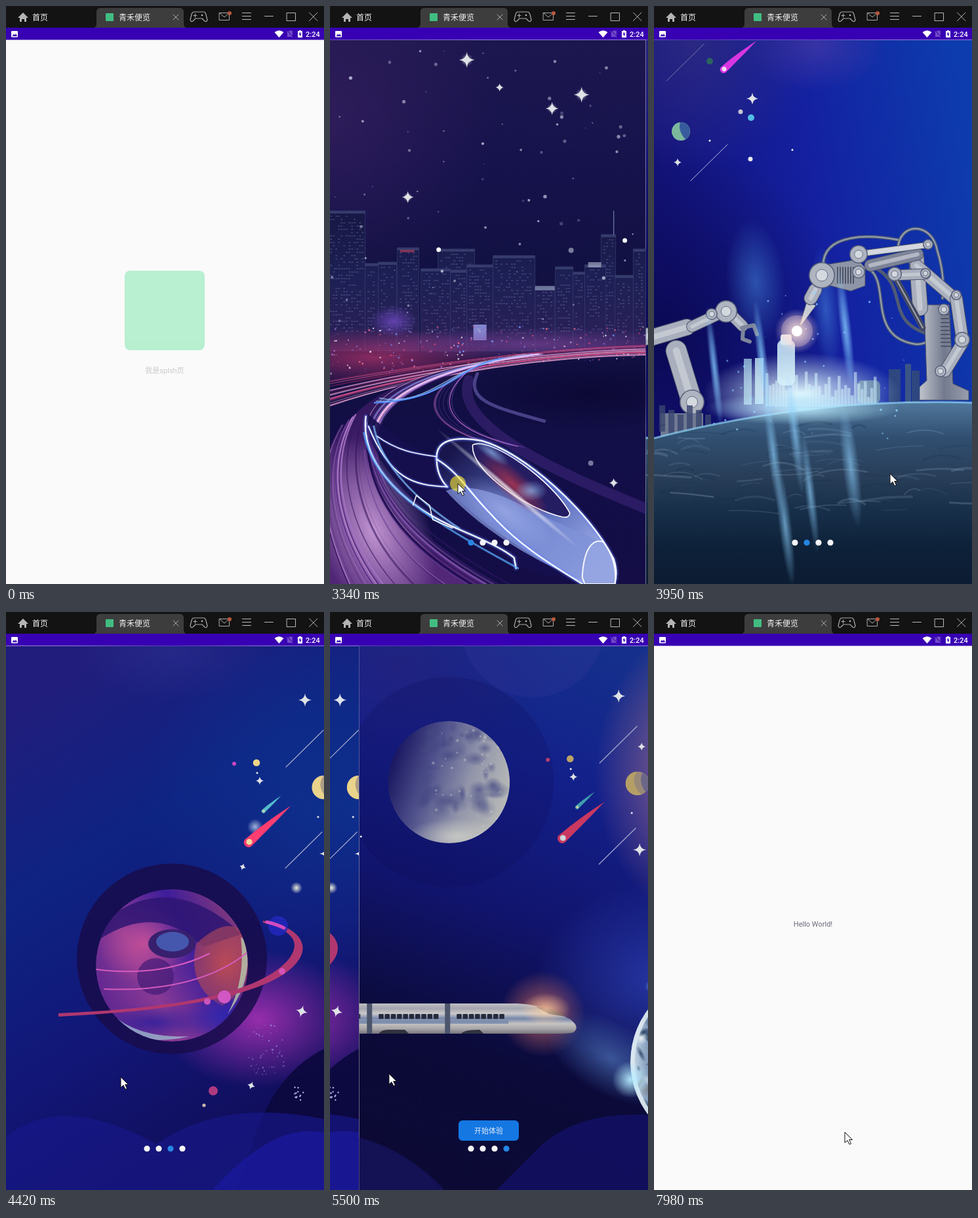
Recreate the animation shown at these times as an HTML page. Size 485 by 880 pixels, loop 8 s.

```html
<!DOCTYPE html>
<html lang="zh">
<head>
<meta charset="utf-8">
<title>App walkthrough</title>
<style>
html, body { margin: 0; width: 100%; height: 100%; overflow: hidden; background: #fafafa; }
svg { display: block; width: 100vw; height: 100vh; }
text { font-family: Roboto, "Noto Sans CJK SC", "Noto Sans CJK", "Noto Sans", sans-serif; }
</style>
</head>
<body>
<svg id="stage" viewBox="0 0 485 880"></svg>
<script>
const W = 485, LOOP = 8000;
const defs = [];
let seed = 7;
const rnd = (a = 0, b = 1) => {
  seed = (seed * 16807) % 2147483647;
  return a + (b - a) * seed / 2147483647;
};
const pick = list => list[Math.floor(rnd(0, list.length))];
const times = (n, fn) => Array.from({ length: n }, (_, i) => fn(i)).join('');

// SVG string helpers
const rect = (x, y, w, h, fill, more = '') => `<rect x="${x}" y="${y}" width="${w}" height="${h}" fill="${fill}" ${more}/>`;
const dot = (x, y, r, fill, o = 1, more = '') => `<circle cx="${x}" cy="${y}" r="${r}" fill="${fill}" opacity="${o}" ${more}/>`;
const shape = (d, fill, o = 1, more = '') => `<path d="${d}" fill="${fill}" opacity="${o}" ${more}/>`;
const line = (d, color, w = 1, o = 1) =>
  `<path d="${d}" fill="none" stroke="${color}" stroke-width="${w}" opacity="${o}" stroke-linecap="round" stroke-linejoin="round"/>`;
const label = (x, y, size, fill, s, more = '') => `<text x="${x}" y="${y}" font-size="${size}" fill="${fill}" ${more}>${s}</text>`;
const group = (s, more) => `<g ${more}>${s}</g>`;

function gradient(x1, y1, x2, y2, ...stops) {
  const id = 'g' + defs.length;
  defs.push(`<linearGradient id="${id}" gradientUnits="userSpaceOnUse" x1="${x1}" y1="${y1}" x2="${x2}" y2="${y2}">` +
    stops.map((c, i) => `<stop offset="${i / (stops.length - 1)}" stop-color="${c}"/>`).join('') + '</linearGradient>');
  return `url(#${id})`;
}
function glow(x, y, rx, color, o = 1, ry = rx, turn = 0) {
  const id = 'r' + color.slice(1);
  const def = `<radialGradient id="${id}"><stop offset="0" stop-color="${color}"/>` +
    `<stop offset=".5" stop-color="${color}" stop-opacity=".5"/><stop offset="1" stop-color="${color}" stop-opacity="0"/></radialGradient>`;
  if (!defs.includes(def)) defs.push(def);
  return `<ellipse cx="${x}" cy="${y}" rx="${rx}" ry="${ry}" fill="url(#${id})" opacity="${o}" transform="rotate(${turn} ${x} ${y})"/>`;
}
const sparkle = (x, y, s, turn = 0, fill = '#dfe2e6') =>
  shape(`M0 ${-s}Q1 -1 ${s} 0Q1 1 0 ${s}Q-1 1 ${-s} 0Q-1 -1 0 ${-s}`, fill, 1, `transform="translate(${x} ${y}) rotate(${turn})"`);
const comet = (x, y, k, color, head) =>
  group(shape('M0 -7C-11 -9 -11 9 0 7C24 5 56 3 84 0C56 -4 24 -7 0 -7', color) + dot(0, 0, 4.5, head),
    `transform="translate(${x} ${y}) rotate(-41) scale(${k})"`);
const neon = (d, w = 2, o = 1) => line(d, '#5a6cff', w * 4, .22 * o) + line(d, '#9cc4ff', w * 2, .4 * o) + line(d, '#fff', w, o);
const curve = p => `M${p[0]} ${p[1]}C${p.slice(2).map(v => v.toFixed(1)).join(' ')}`;
const bundle = (a, b, n, colors, w = 1.4) => times(n, () => {
  const k = rnd();
  return line(curve(a.map((v, i) => v + (b[i] - v) * k)), pick(colors), rnd(.5, w), rnd(.3, .9));
});
const link = (x1, y1, x2, y2, w, color = '#a9afbd') => {
  const d = `M${x1} ${y1}L${x2} ${y2}`;
  return line(d, '#4a5168', w + 2) + line(d, color, w) + line(d, '#d5d9e0', w * .35, .6);
};
const joint = (x, y, r) => dot(x, y, r, '#596078') + dot(x, y, r - 1.5, '#aeb4c0') + dot(x, y, r * .45, '#d4d8df', 1, 'stroke="#6a7084"');

// Night city with a fast train
function cityPage() {
  const towers = [[0, 312, 57], [57, 392, 20], [77, 390, 28], [168, 370, 56], [106, 368, 33], [142, 400, 45], [187, 402, 25],
    [212, 394, 40], [316, 428, 30], [252, 380, 64], [347, 397, 27], [374, 405, 18], [417, 348, 22], [392, 394, 32], [438, 410, 28], [466, 370, 19]];
  const wall = gradient(0, 310, 0, 520, '#171744', '#1d2054', '#2b2058');
  const skyline = towers.map(([x, y, w]) => {
    let d = '';
    for (let j = y + 8; j < 500; j += 5)
      for (let i = x + 4; i < x + w - 4; i += 4) if (rnd() < .42) d += `M${i} ${j}h2`;
    return rect(x, y, w, 525 - y, wall, 'stroke="#34396e" stroke-width=".8"') + rect(x, y, w, 4, '#353b6c') + line(d, '#8796c8', 1.1, .5);
  }).join('');
  const lights = times(260, () => {
    const x = rnd(0, W);
    return dot(x, rnd(488, 535 + (W - x) * .06), rnd(.4, 1.6), pick(['#ff6b8e', '#e04678', '#a87be0', '#fff', '#7c9cff']), rnd(.3, .9));
  });
  const stars = times(75, () => dot(rnd(5, 480), rnd(65, 480), rnd(.6, 2.7), '#cdd0e8', rnd(.25, .8)));
  const body = gradient(200, 670, 400, 880, '#19164e', '#5266b8', '#a9b6ec');
  return rect(0, 52, W, 828, gradient(0, 52, 0, 880, '#1d174f', '#15124b', '#11113f', '#120e47', '#140d46')) +
    glow(0, 170, 260, '#37205f', .7) + skyline + line('M436 348V312', '#7580a8', 1.2) +
    rect(316, 426, 30, 7, '#aab4d0', 'opacity=".5"') + rect(397, 390, 20, 8, '#b8bfd6', 'opacity=".6"') +
    rect(110, 371, 22, 4, '#a83c5c', 'opacity=".7"') + rect(222, 485, 20, 24, '#a8b0ff', 'opacity=".7"') +
    glow(70, 535, 200, '#c73870', .65, 45) + glow(310, 515, 280, '#8b4aa3', .55, 26) + glow(100, 480, 36, '#7a4fd0', .7, 24) +
    lights + glow(400, 590, 220, '#0b0834', .9, 55) + stars +
    bundle([W, 516, 350, 520, 170, 540, 0, 570], [W, 532, 330, 535, 150, 560, 0, 612], 26, ['#ff6a8a', '#c04a90', '#e9b4e0', '#b3265c']) +
    shape('M230 545C90 565 20 620 0 690V880H240C120 810 50 710 85 625Q130 570 250 545', gradient(0, 560, 100, 880, '#251052', '#56297c', '#5c2b80'), .85) +
    glow(70, 800, 85, '#c79ad6', .95, 150, -20) +
    bundle([70, 600, 30, 690, 60, 800, 150, 880], [20, 640, -30, 720, 0, 810, 30, 880], 22, ['#a674c4', '#d8a5e0', '#5c2f8c', '#38185f'], 2.4) +
    bundle([65, 640, 70, 740, 150, 810, 280, 880], [55, 680, 60, 770, 110, 840, 170, 880], 22, ['#1c0c4a', '#3a1c70', '#8c5cb4'], 3) +
    line('M215 570C190 640 350 710 485 765', '#513090', 16, .4) + line('M228 560C210 600 250 610 330 632', '#8274cc', 5, .5) +
    bundle([240, 548, 140, 575, 130, 630, 232, 662], [215, 552, 180, 590, 160, 640, 300, 672], 10, ['#e06aa8', '#8f6ae0', '#5b3a9c']) +
    bundle([300, 530, 220, 545, 70, 560, 58, 640], [330, 530, 160, 550, 80, 600, 75, 660], 14, ['#fff', '#7db4ff', '#d59cff', '#ff9cc4'], 2) +
    bundle([270, 535, 200, 545, 190, 600, 70, 605], [240, 545, 180, 560, 140, 612, 80, 596], 12, ['#4f8cff', '#8cd0ff', '#fff']) +
    shape('M60 620C60 700 140 780 290 855L390 880C330 850 240 790 182 732Q166 715 166 690Q110 665 60 620', '#17104e', .9) +
    shape('M166 690C164 662 190 654 225 659C290 672 400 770 436 840Q444 866 436 880H388C300 830 225 785 182 732Z', body) +
    shape('M180 738C215 725 260 742 300 762C360 792 400 808 415 815Q390 825 388 874C325 850 235 800 180 738', '#7f92d8', .75) +
    glow(270, 770, 85, '#aebcf4', .55, 35, 35) +
    shape('M221 668C250 655 345 725 369 772Q368 780 358 778C300 765 216 705 221 668', '#251d62', 1, 'stroke="#fff" stroke-width="1.6"') +
    glow(282, 728, 70, '#b6384e', .8, 22, 42) + glow(310, 738, 25, '#93bbf0', .7, 16) + glow(250, 680, 32, '#93bbf0', .7, 10, 35) +
    glow(275, 735, 145, '#ffffff', .8, 5, 40) +
    neon('M182 732Q166 715 166 690C164 662 190 654 235 662C300 680 400 770 436 842Q443 864 437 880', 2) +
    neon('M166 690C200 710 215 740 250 775C290 820 340 850 388 880', 2) +
    neon('M58 625C50 690 105 752 185 790C205 800 260 820 284 840L287 856', 2) +
    neon('M62 640C95 720 130 730 182 732', 1.6) + neon('M75 655C110 680 140 682 166 686', 1.3) +
    line('M55 650C70 730 150 780 290 856', '#5ab0ff', 3, .7) + line('M70 640C80 690 120 742 200 795', '#7fc2ff', 3, .7) +
    line('M130 760L135 745L155 760L160 782L190 795', '#fff', 1.5) +
    shape('M388 870C390 825 405 810 420 816Q442 845 438 880H392Z', '#93a4e2', .9, 'stroke="#fff" stroke-width="2"') +
    [[212, 82, 12], [262, 124, 6], [387, 135, 12], [342, 156, 10], [122, 291, 9], [436, 726, 7]]
      .map(([x, y, s]) => glow(x, y, s * .8, '#ffffff', .6) + sparkle(x, y, s)).join('') +
    dot(169, 371, 3.5, '#fff') + dot(453, 357, 3.5, '#fff') + dot(371, 372, 4, '#7a7b9c') + dot(401, 696, 4, '#74759c');
}

// Robot arms over a planet
function robotPage() {
  const streaks = times(75, () => {
    const x = rnd(-30, 460), y = rnd(640, 770), w = rnd(20, 85);
    return line(`M${x} ${y}q${w / 2} ${rnd(-14, 3)} ${w} ${rnd(-7, 7)}`, pick(['#7693b0', '#9ab0c4', '#15304d']), rnd(1, 4), rnd(.1, .3));
  });
  const houses = times(34, i => {
    const h = rnd(12, 55);
    return rect(170 + i * 5, 610 - h, 4.5, h, '#bddcf2', 'opacity=".6"');
  });
  const beams = [[155, 420, 45], [92, 550, 7], [165, 540, 8], [262, 460, 22], [292, 490, 9], [182, 680, 9], [215, 650, 9], [238, 740, 8], [300, 700, 13], [200, 790, 10]];
  return rect(0, 52, W, 828, gradient(0, 300, W, 220, '#14137a', '#1420a0', '#0d3cae')) +
    glow(0, 500, 300, '#090850', .9) + glow(245, 60, 110, '#5540a8', .55, 70) + glow(60, 60, 190, '#332e80', .7) +
    beams.slice(0, 5).map(([x, y, w]) => glow(x, y, w, '#4f9cf0', .45, 95, -5)).join('') +
    line('M258 395C258 345 330 348 372 356M372 372C372 328 424 328 432 372Q444 410 440 445M330 402C360 425 325 505 400 515Q420 515 426 500M340 400C390 430 350 480 420 500', '#4f5b74', 5) +
    line('M258 395C258 345 330 348 372 356M372 372C372 328 424 328 432 372Q444 410 440 445M330 402C360 425 325 505 400 515Q420 515 426 500', '#98a2b2', 2) +
    shape('M412 455H450L456 575L480 586V600H405V580L416 570Z', gradient(405, 0, 480, 0, '#c0c4cc', '#737a8e', '#989eac'), 1, 'stroke="#4a5168"') +
    times(9, i => line(`M438 ${470 + i * 6}h14`, '#4f566c', 2)) +
    link(400, 382, 406, 460, 22) + link(400, 395, 458, 445, 18) + link(461, 445, 470, 505, 18) + link(471, 512, 444, 556, 17) +
    link(330, 395, 402, 378, 17, '#7d8498') + link(365, 408, 410, 490, 7, '#3c435a') + link(316, 377, 416, 364, 8, '#d2d6dc') +
    link(365, 410, 414, 408, 15) +
    shape('M255 395L310 386L322 398V426L300 434L262 424Z', '#8e95a6', 1, 'stroke="#4a5168"') + times(7, i => line(`M${280 + i * 4} 398v24`, '#4c5368', 2)) +
    shape('M233 450L247 456L226 484L222 487Z', '#c6cbd4', 1, 'stroke="#4a5168"') + link(246, 432, 239, 445, 19) +
    [[256, 410, 20], [312, 378, 14], [312, 405, 10], [367, 408, 11], [418, 363, 8], [414, 407, 8], [442, 462, 9], [461, 440, 8], [470, 508, 12], [437, 556, 9]].map(a => joint(...a)).join('') +
    link(34, 525, 57, 600, 31) + link(-8, 506, 50, 489, 24) + link(58, 488, 105, 466, 16) + link(118, 470, 135, 487, 16) +
    line('M134 490L152 486L157 500M136 492L135 507L146 511', '#7d859a', 6) + joint(110, 465, 17) + joint(88, 469, 9) + joint(58, 603, 19) +
    rect(10, 620, 65, 35, '#6f7992') + times(6, i => rect(8 + i * 14, 608 + i % 3 * 7, 9, 40, '#3a4770', 'opacity=".8"')) +
    rect(137, 537, 12, 70, '#7e9fc8') + rect(154, 536, 13, 70, '#9ebbd9') + rect(188, 508, 27, 70, '#b5d0e8', 'rx="9"') + rect(193, 500, 17, 16, '#d4e6f3', 'rx="4"') +
    rect(358, 553, 18, 50, '#2e4780') + rect(383, 545, 9, 60, '#3a5586') + rect(393, 555, 12, 50, '#2e4780') + rect(310, 570, 35, 35, '#52749d', 'rx="8"') +
    houses + glow(225, 590, 150, '#dff8ff', 1, 62) +
    shape('M0 658Q240 596 485 604V880H0Z', gradient(0, 600, 0, 880, '#527a9f', '#314f71', '#293f5a', '#182f4a', '#0d2139', '#0c1c32')) + streaks +
    line('M0 658Q240 596 485 604', '#8ed4f5', 3, .7) + glow(225, 613, 150, '#bfefff', .9, 25) +
    beams.map(([x, y, w], i) => i && i !== 3 ? glow(x, y, w, '#8fd2ff', .65, 95, -7) : '').join('') +
    times(45, () => dot(rnd(70, 390), rnd(430, 660), rnd(.5, 1.8), '#8fd4ff', rnd(.3, .9))) +
    dot(218, 495, 24, '#ffd0cc', .28) + glow(218, 495, 34, '#ffe3dc', .95) + dot(218, 495, 8, '#fff') +
    line('M19 114L76 58', '#737bac') + line('M56 266L112 211', '#b8bfe0') + comet(107, 96, .78, '#d836e2', '#f5d9f5') +
    dot(41, 191, 14, '#7bb89c') + shape('M40 177A14 14 0 0 1 48 203Q36 190 40 177', '#385b9e') + dot(85, 84, 5, '#2c635f') + dot(132, 161, 3.5, '#c7c7ce') +
    dot(148, 170, 5, '#55bde5') + dot(147, 233, 3.5, '#e5e8ee') + dot(85, 205, 1.5, '#fff') + dot(211, 219, 1.5, '#fff') + sparkle(150, 141, 9) + sparkle(36, 238, 6);
}

const meteors = (x, y, dim) => group(
  sparkle(396, 128, 10) + sparkle(327, 251, 6) + sparkle(431, 205, 6) + sparkle(428, 362, 10) +
  line('M367 230L424 174M366 384L422 329', '#a9afd0', 1.1) + dot(288, 225, 3, dim ? '#b63f73' : '#cf44c0') + dot(322, 223.5, 5.3, dim ? '#bda364' : '#efd486') +
  dot(323, 239, 1.6, '#e0e3e8') + dot(416, 306, 1.6, '#e0e3e8') + dot(424.5, 261, 18, dim ? '#b59f66' : '#ead38a') +
  shape('M424 243A18 18 0 0 1 431 278Q412 261 424 243', '#877c86', .6) + shape('M432 245A18 18 0 0 1 437 274Q426 260 432 245', '#535390', .65) +
  comet(333, 297, .42, dim ? '#3f9fae' : '#52bccb', '#d8d2a0') + comet(311, 344, 1, dim ? '#c93860' : '#ff3d70', dim ? '#cfd4d8' : '#eddca0'),
  `transform="translate(${x} ${y})"`);

// Ringed planet
function planetPage() {
  defs.push('<clipPath id="ball"><circle cx="253" cy="538" r="116"/></clipPath>');
  const planet = dot(253, 538, 116, gradient(140, 600, 370, 480, '#5a2590', '#8a3a94', '#3d1d9a', '#8c3d78')) +
    glow(210, 505, 70, '#c65098', .9, 60) + glow(335, 535, 48, '#dd5546', .95, 62) + shape('M150 470Q250 390 360 490L300 510Q230 440 140 500Z', '#2e1672', .85) +
    shape('M290 505Q340 460 362 490Q380 570 330 600Q275 570 290 505', '#a9465c', .65) + glow(225, 625, 95, '#34209a', .9, 28) +
    dot(228, 555, 28, '#491c78', .75) + `<ellipse cx="253" cy="505" rx="36" ry="22" fill="#38206e"/><ellipse cx="254" cy="502" rx="25" ry="15" fill="#4557ad"/>` +
    glow(330, 615, 55, '#3127ac', .9, 35) + shape('M366 500Q378 560 338 612Q366 560 358 495Z', '#b5c9ad', .8) + shape('M150 600Q190 650 280 646Q220 660 180 640Z', '#9bb6ce', .8) +
    line('M150 574C240 578 320 560 372 515M130 543C210 555 270 540 310 520', '#d65bbe', 2);
  return rect(0, 52, W, 828, gradient(0, 150, 400, 800, '#211d7c', '#0e2382', '#121676', '#100d58')) +
    glow(250, 60, 150, '#292c8c', .7, 75) + glow(485, 300, 280, '#0d3b97', .6) + glow(385, 620, 150, '#ad32b5', .85, 105) +
    dot(253, 528, 145, '#180c4c', .85) + group(planet, 'clip-path="url(#ball)"') +
    shape('M392 470C445 478 466 506 444 533C412 575 300 605 80 616V611C300 602 395 570 430 530C454 500 432 484 392 473Z', '#b0376f') +
    dot(415, 478, 15, '#2527bd', .85) + line('M398 472Q412 475 424 481', '#d44bbf', 5) + dot(333, 586, 10, '#d158c4') + dot(307, 593, 5, '#cb55bb') + dot(421, 547, 5, '#d452b8') +
    times(50, () => dot(rnd(370, 425), rnd(625, 705), rnd(.5, 1.5), '#9b8fe0', rnd(.3, .8))) +
    shape('M375 815Q405 705 485 665V880H350Z', '#0c083e', .9) + times(12, () => dot(rnd(440, 456), rnd(722, 745), 1.2, '#a9aee0')) +
    shape('M0 800Q80 730 230 810Q330 740 485 772V880H0Z', '#18178a', .65) + shape('M315 880Q410 775 485 793V880Z', '#1a1aa0', .7) +
    glow(380, 327, 12, '#c3d2ee', .8) + glow(443, 420, 9, '#e8ecdc') + sparkle(451, 608, 9, 15) + sparkle(374, 721, 6, 20) + sparkle(361, 388, 5, 20) +
    dot(316, 729, 7, '#ad3a80') + dot(302, 751, 2.6, '#c9b8ae') + meteors(60, 6, false);
}

// Train between moon and earth
function spacePage() {
  defs.push('<clipPath id="moon"><circle cx="137" cy="259" r="93"/></clipPath><clipPath id="earth"><circle cx="547" cy="685" r="133"/></clipPath>');
  const moon = dot(137, 259, 93, gradient(48, 225, 225, 285, '#17145f', '#50528c', '#9295aa', '#b7b9b7')) +
    times(48, () => glow(rnd(95, 215), rnd(175, 305), rnd(5, 21), '#444882', rnd(.3, .75), rnd(4, 17))) +
    times(35, () => dot(rnd(100, 225), rnd(180, 340), rnd(.8, 2.5), '#d2d3ce', .4)) + glow(148, 342, 75, '#d4d5ca', .75, 28);
  const earth = dot(547, 685, 133, gradient(414, 0, 490, 0, '#cfe0ee', '#637fa5', '#24446f')) +
    times(55, () => glow(rnd(420, 490), rnd(565, 805), rnd(4, 18), pick(['#eef3f5', '#1c3358', '#7a7268']), rnd(.4, .9), rnd(3, 16), rnd(0, 90))) +
    dot(547, 685, 130, 'none', .9, 'stroke="#dce8f0" stroke-width="7"');
  const windows = [[30, 10], [149, 8]].map(([x, n]) => times(n, i => rect(x + i * 9.3, 612, 7.5, 7.5, '#252a3c', 'rx="1"'))).join('');
  return rect(0, 52, W, 828, gradient(380, 52, 100, 880, '#15308c', '#13208a', '#11146c', '#0b0a38', '#0c0a34')) +
    glow(60, 80, 240, '#25207c', .75, 160) + dot(265, 20, 110, '#34359a', .3) + glow(525, 245, 165, '#b6798f', .9, 225) + glow(450, 560, 180, '#293cae', .8, 150) +
    dot(137, 259, 160, '#0f0d55', .22) + group(moon, 'clip-path="url(#moon)"') +
    glow(280, 612, 65, '#c86a66', .85, 65) + glow(385, 680, 110, '#5c8bd0', .55, 55, 30) +
    shape('M0 596H235C270 596 295 606 322 620Q338 632 327 640Q322 642 300 642H0Z', gradient(0, 596, 0, 642, '#bfbfc4', '#a4a5b0', '#cbc9ca', '#7485aa', '#c5c2c2', '#a9a6a9', '#77757d')) +
    rect(0, 622, 228, 5, '#607ba6', 'opacity=".6"') + rect(-6, 612, 8, 7, '#252a3c') + windows + [[12, 8], [131, 8]].map(([x, w]) => rect(x, 596, w, 46, '#4c556c')).join('') +
    shape('M30 642Q34 636 44 636H70L76 642ZM156 642Q160 636 184 636L190 642Z', '#30323f') + shape('M270 601Q298 603 315 616L290 612Z', '#604e56') + glow(285, 605, 38, '#ffd0a0', .75, 25) +
    group(earth, 'clip-path="url(#earth)"') + glow(414, 712, 28, '#b5ecff', .95) + glow(445, 570, 9, '#6da1dc', .8) +
    shape('M280 810Q350 750 485 770V880H210Z', '#17157c', .55) + shape('M0 800Q75 820 130 880H0Z', '#1a166a', .6) + dot(3, 342, 1.4, '#fff') + meteors(0, 0, true);
}

const titleBar = rect(0, 0, W, 33, '#131313') +
  shape('M134 33Q138 32 138 27V9Q138 3 144 3H265Q271 3 271 9V27Q271 32 275 33Z', '#3d3d3d') +
  shape('M26 10L34 18H31V24H28V20H24V24H21V18H18Z', '#b4b4b4') + rect(152, 11, 12, 12, '#41bd82', 'rx="1"') +
  label(40, 21.5, 12, '#f2f2f2', '首页') + label(172, 21.5, 12, '#f2f2f2', '青禾便览') +
  line('M255 13L263 21M263 13L255 21', '#aaa') +
  line('M287 9H301Q304 9 305 13L307 21Q306 25 303 23L299 19H289L285 23Q282 25 281 21L283 13Q284 9 287 9M286 14.5H291M288.500 12V17', '#aaa', 1.2) + dot(299, 14, 1.3, '#bbb') +
  line('M325.500 10.500H340.500V21.500H325.500ZM326 11L333 17L340 11', '#aaa') + dot(341, 11, 3, '#b9573d') +
  line('M360.500 10.500H373.500M360.500 15.500H373.500M360.500 20.500H373.500M394.500 15.500H407.500M428.500 10.500H441.500V22.500H428.500ZM462.500 10L475 22.500M475 10L462.500 22.500', '#b8b8b8');
const statusBar = rect(0, 33, W, 18.5, '#3700b3') + rect(8, 38, 10, 9.5, '#fff', 'rx="1"') + shape('M9.500 46L12 42.500L13.500 44.500L15 42L17 46Z', '#3700b3') +
  shape('M409.500 40Q416.500 34.500 423.500 40L416.500 48Z', '#fff') + shape('M429 40L432 37.500H437V47H429Z', '#7049c6') + line('M428 37.500L438 47.500', '#3700b3', 1.5) + line('M428 38.500L437 47.500', '#8c6bd4', 1) +
  shape('M445 38H447V37H450V38H452V48H445Z', '#fff') + shape('M449 39L446.500 43.500H448.300V46.500L450.700 42.200H449Z', '#3700b3') +
  label(457, 46.5, 11, '#fff', '2:24', 'font-weight="500"');

const pages = [cityPage, robotPage, planetPage, spacePage]
  .map((draw, i) => `<svg x="${i * W}" y="0" width="${W}" height="880" viewBox="0 0 ${W} 880">${draw()}</svg>`).join('');
const stage = document.getElementById('stage');
stage.innerHTML = `<defs>${defs.join('')}</defs>` + rect(0, 51, W, 829, '#fafafa') +
  group(rect(181, 403, 122, 121, '#3ddc84', 'rx="8"') + label(242, 559, 11, '#6c7070', '我是splsh页', 'text-anchor="middle"'), 'id="splash"') +
  group(group(pages, 'id="strip"') +
    group(rect(196, 774, 92, 31, '#1477e2', 'rx="6"') + label(242, 794, 11, '#e4edf8', '开始体验', 'text-anchor="middle"'), 'id="enter"') +
    times(4, i => dot(215 + 18 * i, 817, 4.6, '#f4f4f6', 1, 'class="pager"')), 'id="guide"') +
  group(rect(0, 51, W, 829, '#fafafa') + label(242.5, 479, 11, '#6b6878', 'Hello World!', 'text-anchor="middle"'), 'id="home"') +
  titleBar + statusBar +
  group(dot(0, 0, 12, '#f5e22d', .62, 'id="touch"') + shape('M0 0V16L4 12.500L7 18.500L9.500 17.500L6.700 11.500H11.500Z', '#fff', 1, 'stroke="#111" stroke-width="1"'), 'id="cursor"');

const $ = id => document.getElementById(id);
const [splash, strip, enter, guide, home, touch, cursor] = ['splash', 'strip', 'enter', 'guide', 'home', 'touch', 'cursor'].map($);
const pagers = [...document.querySelectorAll('.pager')];
const show = (node, on) => node.setAttribute('visibility', on ? 'visible' : 'hidden');

const smooth = k => k * k * (3 - 2 * k);
const settle = k => 1 - (1 - k) ** 3;
const linear = k => k;
// Each key: time, value or values, easing into it
function track(keys, t) {
  const i = keys.findIndex(k => k[0] > t);
  if (i === 0) return keys[0][1];
  if (i < 0) return keys[keys.length - 1][1];
  const [t0, a] = keys[i - 1], [t1, b, ease = linear] = keys[i];
  const k = ease((t - t0) / (t1 - t0));
  return Array.isArray(a) ? a.map((v, j) => v + (b[j] - v) * k) : a + (b - a) * k;
}
const fadeIn = [[0, .35], [560, .35], [1390, 1]];
const scroll = [[3340, 0], [3780, 1, settle], [4080, 1], [4240, 1.4], [4420, 2, settle], [5110, 2], [5280, 2.423], [5350, 2.56], [5720, 3, settle]];
const pointer = [[2560, [411, 855]], [2950, [337, 717], smooth], [3180, [337, 717]], [3340, [195, 727]], [3560, [195, 727]], [3950, [360, 712], smooth],
  [4060, [360, 712]], [4240, [175, 708]], [4580, [175, 708]], [4960, [353, 705], smooth], [5110, [353, 705]], [5280, [148, 703]], [5350, [90, 703]],
  [5500, [90, 703]], [6110, [262, 783], smooth], [7979, [262, 783]], [7980, [291, 792]]];
const presses = [[3180, 3410], [4030, 4260], [5080, 5360], [6570, 6650]];

function render(t) {
  const page = track(scroll, t), selected = Math.round(page);
  show(splash, t < 1850);
  splash.setAttribute('opacity', track(fadeIn, t));
  show(guide, t >= 1850 && t < 7030);
  strip.setAttribute('transform', `translate(${(-page * W).toFixed(2)} 0)`);
  enter.setAttribute('display', selected === 3 ? 'inline' : 'none');
  pagers.forEach((p, i) => p.setAttribute('fill', i === selected ? '#2686e4' : '#f4f4f6'));
  show(home, t >= 6960);
  home.setAttribute('opacity', t < 7030 ? .6 : 1);
  cursor.setAttribute('display', t >= 2560 ? 'inline' : 'none');
  cursor.setAttribute('transform', `translate(${track(pointer, t).map(v => v.toFixed(1)).join(' ')})`);
  show(touch, presses.some(([a, b]) => t >= a && t < b));
}
const start = performance.now();
function tick() {
  render((performance.now() - start) % LOOP);
  requestAnimationFrame(tick);
}
tick();
</script>
</body>
</html>
```
